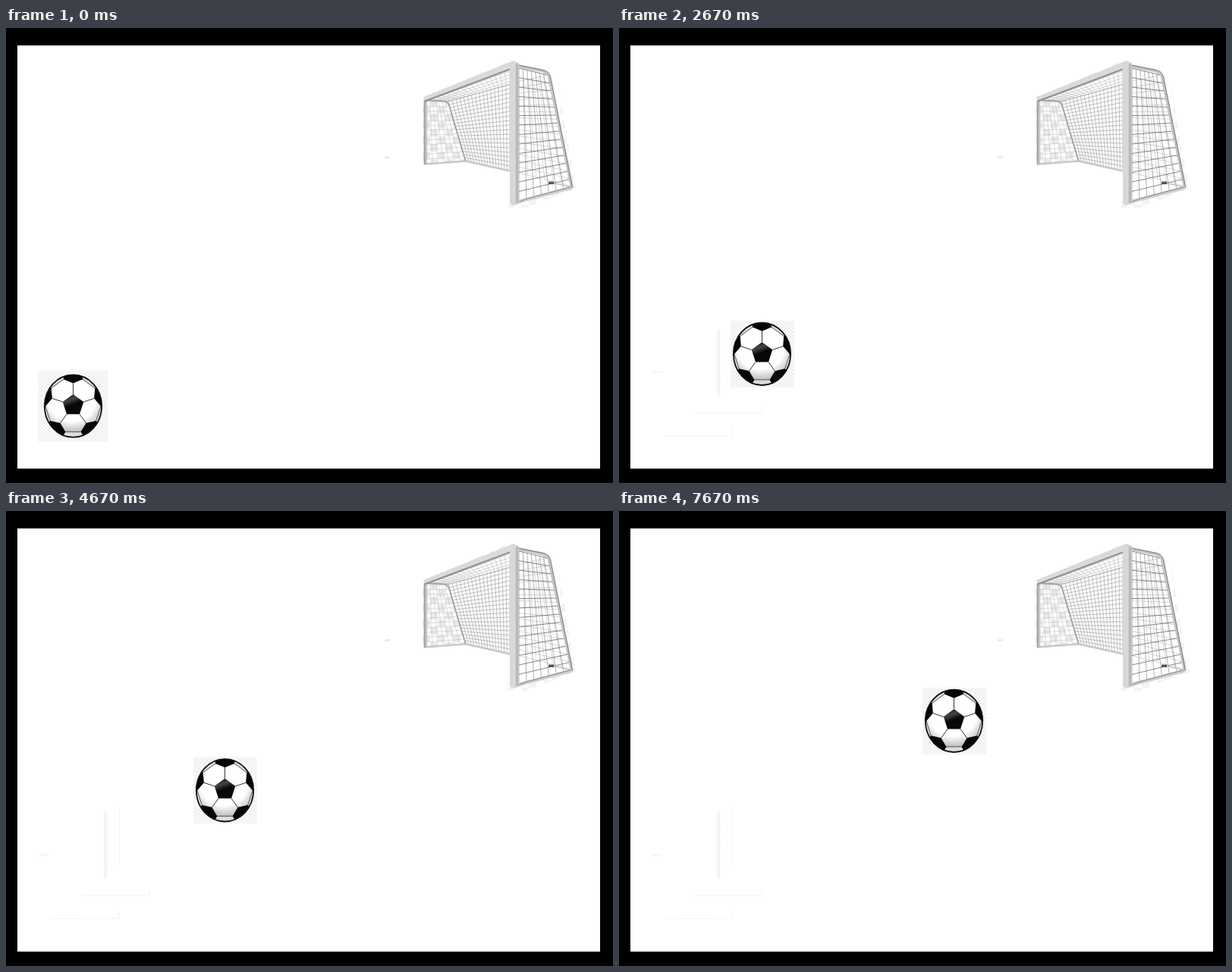
Recreate the animation shown at these times as an HTML page. Size 800 by 600 pixels, loop 8000 ms.

```html
<!DOCTYPE html>
<html lang="en">
<head>
<meta charset="utf-8">
<title>Ball and goal</title>
<style>
html, body { margin: 0; width: 100%; height: 100%; overflow: hidden; background: #000; }
svg { display: block; width: 800px; height: 600px; }
</style>
</head>
<body>
<svg viewBox="0 0 800 600" fill="none">
  <defs>
    <pattern id="fine" width="5" height="5" patternUnits="userSpaceOnUse">
      <path d="M0 0h2.5v5h2.5v-2.5h-5z" fill="#ebebeb"/>
    </pattern>
    <pattern id="coarse" x="549" y="103" width="20" height="20" patternUnits="userSpaceOnUse">
      <path d="M0 0h10v20h10v-10h-20z" fill="#ebebeb"/>
    </pattern>
    <radialGradient id="skin" cx=".48" cy=".38" r=".65">
      <stop offset=".65" stop-color="#fff"/><stop offset="1" stop-color="#b4b4b4"/>
    </radialGradient>
    <linearGradient id="sheen" x1=".2" y1="0" x2=".6" y2="1">
      <stop offset="0" stop-color="#111"/><stop offset=".3" stop-color="#444"/><stop offset=".55" stop-color="#080808"/>
    </linearGradient>
    <clipPath id="round"><ellipse rx="38" ry="41.5"/></clipPath>
  </defs>

  <path d="M15 23H783V581H15z" fill="#fff"/>

  <g id="goal">
    <path d="M590 74L662 44V50L590 79zM727 70L751 213H741zM662 228L748 213 686 237H662z" fill="url(#coarse)" opacity=".6"/>
    <path d="M549 95H583L605 176 549 182z" fill="url(#coarse)"/>
    <path d="M499 170.500h7" stroke="#ececec" stroke-width="3"/>
    <g id="nets"></g>
    <path d="M551 179.500L606 175.500L664 188.500" stroke="#c8c8c8" stroke-width="2.5"/>
    <path d="M555 95L578 96.500Q582 97 584 102L605.500 175" stroke="#999" stroke-width="1.3"/>
    <path d="M552.500 95V180" stroke="#bbb" stroke-width="4"/>
    <path d="M551.500 95V180" stroke="#999"/>
    <path d="M550 91L664 45 668 52 552 97z" fill="#dadada"/>
    <path d="M552 96.500L664 54.500" stroke="#909090" stroke-width="2.4"/>
    <path d="M675 229L746 210.500" stroke="#d0d0d0" stroke-width="4.5"/>
    <path d="M674 230L687 225L745 209.500" stroke="#888"/>
    <path d="M721 204.500L746 210" stroke="#aaa"/>
    <path d="M715 204.300h7" stroke="#555" stroke-width="3.500"/>
    <g id="frame">
      <path id="bend" d="M675 50L707 56.500Q714 58 716 64L746 211" stroke="#c4c4c4" stroke-width="3.500"/>
      <use href="#bend"/>
      <path d="M675 49L708 55.500Q715 57 717.500 64L746.500 210" stroke="#7d7d7d"/>
    </g>
    <path d="M664 45L669 43 676 46V231L670 234 664 232z" fill="#d8d8d8"/>
    <path d="M673.500 47V231" stroke="#b8b8b8" stroke-width="3.500"/>
  </g>

  <!-- Faint marks that stay behind once the ball has passed. -->
  <g id="traces" stroke="#ebebeb">
    <path data-from="1" d="M43 455l2.500-3 2.500 3 2.500-3 2.500 3 2.500-3 1 2"/>
    <path data-from="2" d="M60 537.500H149.500V526" stroke-dasharray="3 2"/>
    <path data-from="5" d="M101 507.500H188.500V499" stroke-dasharray="3 2"/>
    <path data-from="8" d="M129 397h4.500v88h-4.500z" fill="url(#fine)" stroke="none"/>
    <path data-from="9" d="M149.500 389V467" stroke="#f4f4f4"/>
  </g>

  <g id="ball">
    <rect id="backing" fill="#fff"/>
    <rect id="checks" fill="url(#fine)"/>
    <g clip-path="url(#round)">
      <ellipse rx="38" ry="41.5" fill="#dcdcdc"/>
      <path id="face" fill="url(#skin)" stroke="#555"/>
      <path id="seams" stroke="#333"/>
      <path id="patches" fill="#050505"/>
      <path id="centre" fill="url(#sheen)"/>
    </g>
    <ellipse rx="37.7" ry="41.2" stroke="#111" stroke-width="1.800"/>
  </g>
</svg>
<script>
const $ = id => document.getElementById(id);
const mix = (a, b, k) => a.map((n, i) => n + (b[i] - n) * k);
const line = (...points) => 'M' + points.map(p => p.map(n => n.toFixed(1))).join('L');

// Lines from edge a-b to edge c-d.
function strands(a, b, c, d, count, color, width) {
  let path = '';
  for (let i = 0; i <= count; i++) path += line(mix(a, b, i / count), mix(c, d, i / count));
  $('nets').innerHTML += `<path d="${path}" stroke="${color}" stroke-width="${width}"/>`;
}
// Corners: top left, top right, bottom right, bottom left.
function net([tl, tr, br, bl], cols, rows, color, width, rowColor = color) {
  strands(tl, tr, bl, br, cols, color, width);
  strands(tl, bl, tr, br, rows, rowColor, width);
}
net([[555, 97], [582, 98], [605, 175], [555, 179]], 7, 13, '#c4c4c4', .6);
net([[555, 96], [664, 57], [664, 75], [582, 97]], 17, 4, '#b4b4b4', .6);
net([[583, 97], [664, 74], [664, 188], [606, 175]], 16, 19, '#999', .6);
net([[676, 70], [714, 62], [744, 208], [676, 191]], 6, 15, '#c0c0c0', .6);
net([[676, 53], [714, 62], [745, 210], [676, 228]], 7, 14, '#999', .75, '#606060');

// Five-fold ball: a central pentagon, seams, and a patch at the end of each seam.
function buildBall() {
  const polar = (r, deg) => {
    const a = deg * Math.PI / 180;
    return [r * Math.sin(a), -1 - r * Math.cos(a)];
  };
  const centre = [], rim = [];
  let seams = '', patches = '';
  for (let a = 0; a < 360; a += 72) {
    const inner = polar(14.5, a), tip = polar(29, a);
    const from = polar(36.5, a - 20), to = polar(36.5, a + 20);
    centre.push(inner);
    rim.push(from, to);
    seams += line(inner, tip);
    patches += line(tip, to, polar(46, a + 17), polar(46, a - 17), from) + 'z';
  }
  const parts = { centre: line(...centre) + 'z', face: line(...rim) + 'z', seams, patches };
  for (const id in parts) $(id).setAttribute('d', parts[id]);
}
buildBall();

// Key points of the throw: step, x, y.
const STEPS = 24;
const keys = [
  [0, 88.5, 498.5], [5, 155.5, 454.8], [8, 188.5, 429.8], [10, 222.5, 410], [12, 247.5, 388.8],
  [16, 329.5, 347.8], [18, 356.5, 332], [19, 356.5, 332], [21, 385.5, 314], [22, 427.5, 286], [23, 441.5, 276.8]
];
function position(step) {
  const i = Math.max(1, keys.findIndex(key => key[0] >= step));
  const a = keys[i - 1], b = keys[i];
  return mix(a, b, (step - a[0]) / (b[0] - a[0])).slice(1);
}

function draw() {
  const step = Math.floor((performance.now() % 8000 + 4) * 3 / 1000) % STEPS;
  $('ball').setAttribute('transform', `translate(${position(step)})`);
  const grow = Math.max(0, 3 - step);
  const left = step < 8 ? 46.5 : 41.5, half = 44 + grow;
  const box = { x: -left, y: -half, width: left + 42.5 + grow, height: half * 2 };
  for (const id of ['backing', 'checks'])
    for (const key in box) $(id).setAttribute(key, box[key]);
  for (const mark of $('traces').children)
    mark.style.display = step >= +mark.dataset.from ? '' : 'none';
  requestAnimationFrame(draw);
}
draw();
</script>
</body>
</html>
```
